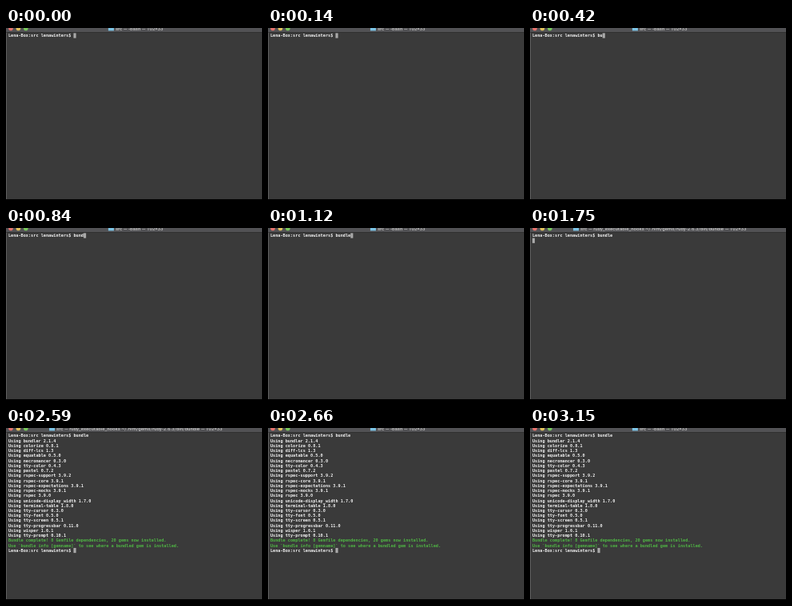
Recreate the animation shown at these times as an HTML page with a canvas. Size 320 px wide and 215 px high, loop 3290 ms.

```html
<!DOCTYPE html>
<html lang="en">
<head>
<meta charset="utf-8">
<title>Terminal: bundle</title>
<style>
  html, body { margin: 0; width: 100%; height: 100%; overflow: hidden; background: #3a3a3a; }
  canvas { display: block; width: 100%; height: 100%; }
</style>
</head>
<body>
<canvas id="stage" width="320" height="215"></canvas>
<script>
const ctx = document.getElementById('stage').getContext('2d');
const LOOP = 3290, CHAR = 3.135, LINE = 6.24, LEFT = 2.9, BASELINE = 11.4;
const MONO = '"DejaVu Sans Mono", monospace', SANS = 'Roboto, sans-serif';
const WHITE = '#f2f2f2', GREEN = '#4fb544';

const PROMPT = 'Lena-Box:src lenawinters$ ';
const COMMAND = 'bundle';
const KEY_TIMES = [350, 420, 630, 840, 980, 1120];
const ENTER = 1540, RUNNING = 1680, OUTPUT = 2590, IDLE = 2660;

const GEMS = `bundler 2.1.4
colorize 0.8.1
diff-lcs 1.3
equatable 0.5.0
necromancer 0.3.0
tty-color 0.4.3
pastel 0.7.2
rspec-support 3.9.2
rspec-core 3.9.1
rspec-expectations 3.9.1
rspec-mocks 3.9.1
rspec 3.9.0
unicode-display_width 1.7.0
terminal-table 1.8.0
tty-cursor 0.3.0
tty-font 0.5.0
tty-screen 0.5.1
tty-progressbar 0.11.0
wisper 1.6.1
tty-prompt 0.10.1`.split('\n');
const SUMMARY = [
  'Bundle complete! 8 Gemfile dependencies, 20 gems now installed.',
  'Use `bundle info [gemname]` to see where a bundled gem is installed.'
];

function rect(x, y, w, h, color) {
  ctx.fillStyle = color;
  ctx.fillRect(x, y, w, h);
}

// Scaling a large font down keeps fractional glyph advances.
function text(string, x, y, size, style, family, color) {
  ctx.save();
  ctx.translate(x, y);
  ctx.scale(size / 100, size / 100);
  ctx.font = `${style} 100px ${family}`;
  ctx.fillStyle = color;
  ctx.fillText(string, 0, 0);
  ctx.restore();
}

function drawTitleBar(t) {
  const process = t >= RUNNING && t < IDLE
    ? 'ruby_executable_hooks ~/.rvm/gems/ruby-2.6.3/bin/bundle'
    : '-bash';
  const title = `src — ${process} — 102×33`;
  const size = 6.08, icon = 7, gap = 2;

  rect(0, 0, 320, 5, '#525255');
  rect(0, 5, 320, 0.6, '#2a2a2a');
  ['#e8736d', '#e3c35c', '#78c95c'].forEach((color, i) => {
    ctx.fillStyle = color;
    ctx.beginPath();
    ctx.arc(6 + 9.4 * i, 0.4, 2.8, 0, Math.PI * 2);
    ctx.fill();
  });

  ctx.font = `500 100px ${SANS}`;
  const width = ctx.measureText(title).width * size / 100;
  const x = 162.2 - (width + icon + gap) / 2;
  rect(x, 0, icon, 3.4, '#7cc4e6');
  text(title, x + icon + gap, 2.7, size, '500', SANS, '#c2c2c2');
}

function terminalLines(t) {
  const typed = KEY_TIMES.filter(time => t >= time).length;
  const lines = [[PROMPT + COMMAND.slice(0, typed), WHITE]];
  if (t >= OUTPUT) {
    GEMS.forEach(gem => lines.push(['Using ' + gem, WHITE]));
    SUMMARY.forEach(line => lines.push([line, GREEN]));
    lines.push([PROMPT, WHITE]);
  } else if (t >= ENTER) {
    lines.push(['', WHITE]);
  }
  return lines;
}

function draw(now) {
  const t = now % LOOP;
  rect(0, 0, 320, 215, '#3a3a3a');
  rect(0, 5, 1, 210, '#5c5c5c');
  rect(0, 214, 320, 1, '#000');
  drawTitleBar(t);

  const lines = terminalLines(t);
  const last = lines.length - 1;
  rect(LEFT + lines[last][0].length * CHAR, 6.4 + last * LINE, CHAR, 6.2, '#a9a9a9');
  lines.forEach(([line, color], i) =>
    text(line, LEFT, BASELINE + i * LINE, CHAR / 0.602, 'bold', MONO, color));
}

const start = performance.now();
function frame() {
  draw(performance.now() - start);
  requestAnimationFrame(frame);
}
frame();
</script>
</body>
</html>
```
